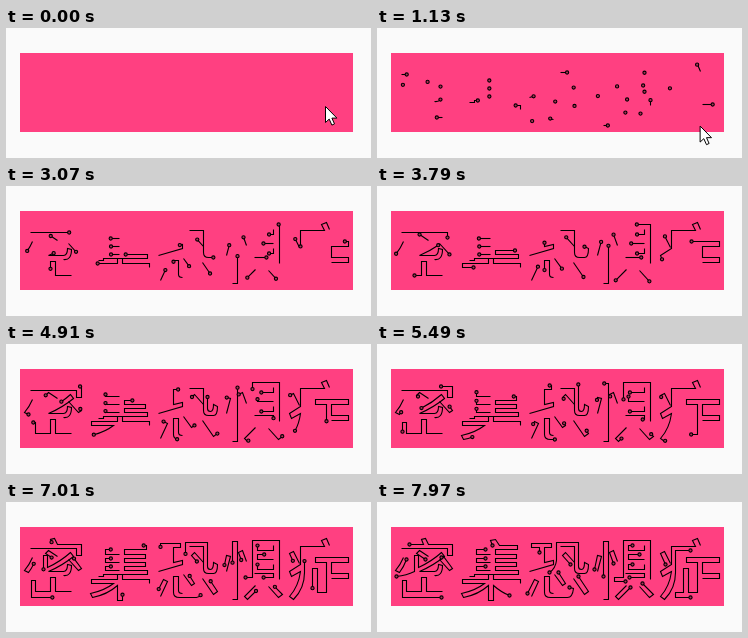
Write an HTML page that moves like this. It is 365 px wide and 130 px high and loops after 8000 ms.

```html
<!DOCTYPE html>
<html lang="zh">
<head>
<meta charset="utf-8">
<title>Outline drawing</title>
<style>
  html, body { margin: 0; width: 100%; height: 100%; overflow: hidden; background: #fafafa; }
  svg { display: block; width: 100vw; height: 100vh; }
  .line { fill: none; stroke: #000; stroke-width: 1.1; }
  .head { fill: #b32d5a; stroke: #000; stroke-width: 1.1; }
</style>
</head>
<body>
<svg viewBox="0 0 365 130">
  <rect width="365" height="130" fill="#fafafa"/>
  <rect x="14" y="25" width="333" height="79" fill="#ff4081"/>
  <g id="ink" transform="translate(.5 .5)"></g>
  <g id="click" fill="none">
    <circle cx="319" cy="78" r="14" stroke="#000"/>
    <circle cx="319" cy="78" r="13" stroke="#fff"/>
  </g>
  <path id="cursor" d="M0 0V16L3.7 12.6L6.4 18.6L9 17.4L6.4 11.6H11.4Z" fill="#fff" stroke="#000" stroke-linejoin="round"/>
</svg>
<script>
const LOOP = 8000, CLICK = 530, START = 830, LEAVE = 500;
const NS = "http://www.w3.org/2000/svg";
const byId = id => document.getElementById(id);

// Outline trails, grouped by character; each is traced at constant speed.
const glyphs = [
  [ // 密
    "M24 46H70V53H75V42H51L48 36L44 37L46 42H32",
    "M26 55Q23 62 18 68L22 70Q26 65 29 57",
    "M51 54L42 48L39 51L48 57",
    "M62 57L72 68L75 66L66 54L64 55",
    "M57 73Q65 74 65 63L61 62Q61 69 57 69H42Q56 63 67 54L64 50Q54 59 41 65V53H37V69Q29 73 19 74",
    "M65 89H49V75H44V89H29V78H25V95H64"
  ],
  [ // 集
    "M113 52H99V47H108",
    "M113 60H99V56H108",
    "M113 68H99V64H108",
    "M92 74H97V72H141V68H118V64H139V60H118V56H139V52H118V47H140V43H122L118 37L113 38L115 43",
    "M143 81V77H116V72H111V77H85V81H107Q98 88 84 91L86 95Q101 92 111 83V98H116V83Q124 90 132 93"
  ],
  [ // 恐
    "M152 69L176 62V58L167 60V45H174V41H154V45H162V50",
    "M183 44H197V66Q197 71 202 71H207Q211 71 211 62L207 60Q207 67 204 67Q201 67 201 64V40H179V58Q178 66 172 70",
    "M197 60L188 50L185 53L193 62",
    "M176 91Q172 91 172 88V74H167V90Q167 95 173 95H190Q195 95 196 86L192 85",
    "M154 94L161 79L157 77L150 91",
    "M177 72L185 83L188 81L181 70",
    "M196 76L207 92L211 89L201 74"
  ],
  [ // 惧
    "M220 69L224 54L220 53L217 67",
    "M240 59L236 48L232 50L236 61",
    "M226 97H231V39H226V74",
    "M273 77V38H246V75H237V79H248",
    "M267 43V48H251V43H255",
    "M267 57H251V52H262",
    "M267 62V67H251V62H255",
    "M248 71H267V75H252",
    "M249 83L238 94L241 97L253 85",
    "M262 84L272 95L276 92L265 81"
  ],
  [ // 症
    "M323 43L320 36L315 38L318 44H294V62L283 69L285 74L294 69Q292 84 283 94L287 97Q298 86 298 70V48H313",
    "M293 61L287 49L283 51L288 62",
    "M325 76H342V71H325V60H342V55H309V60H320V90H311V66H306V90H298V95H313"
  ]
];

function add(tag, attrs) {
  const el = document.createElementNS(NS, tag);
  for (const key in attrs) el.setAttribute(key, attrs[key]);
  return byId("ink").appendChild(el);
}

const trails = glyphs.flat().map(d => {
  const line = add("path", { d, class: "line" });
  return { line, length: line.getTotalLength() };
});
for (const trail of trails) trail.head = add("circle", { r: 1.6, class: "head" });

function show(id, on) {
  byId(id).setAttribute("visibility", on ? "visible" : "hidden");
}

function draw(t) {
  const p = (t - START) / (LOOP - 30 - START);
  show("ink", p >= 0);
  show("click", t >= CLICK && t < START);

  const k = Math.max(0, (t - START) / LEAVE);
  show("cursor", k < 1);
  byId("cursor").setAttribute("transform", `translate(${319.5 + 6 * k} ${78.5 + 54 * k * k})`);

  if (p < 0) return;
  for (const { line, length, head } of trails) {
    const run = length * Math.min(1, p);
    const tip = line.getPointAtLength(run);
    line.setAttribute("stroke-dasharray", `${run} ${length + 9}`);
    head.setAttribute("cx", tip.x);
    head.setAttribute("cy", tip.y);
  }
}

const begin = performance.now();
function tick() {
  draw((performance.now() - begin) % LOOP);
  requestAnimationFrame(tick);
}
tick();
</script>
</body>
</html>
```
